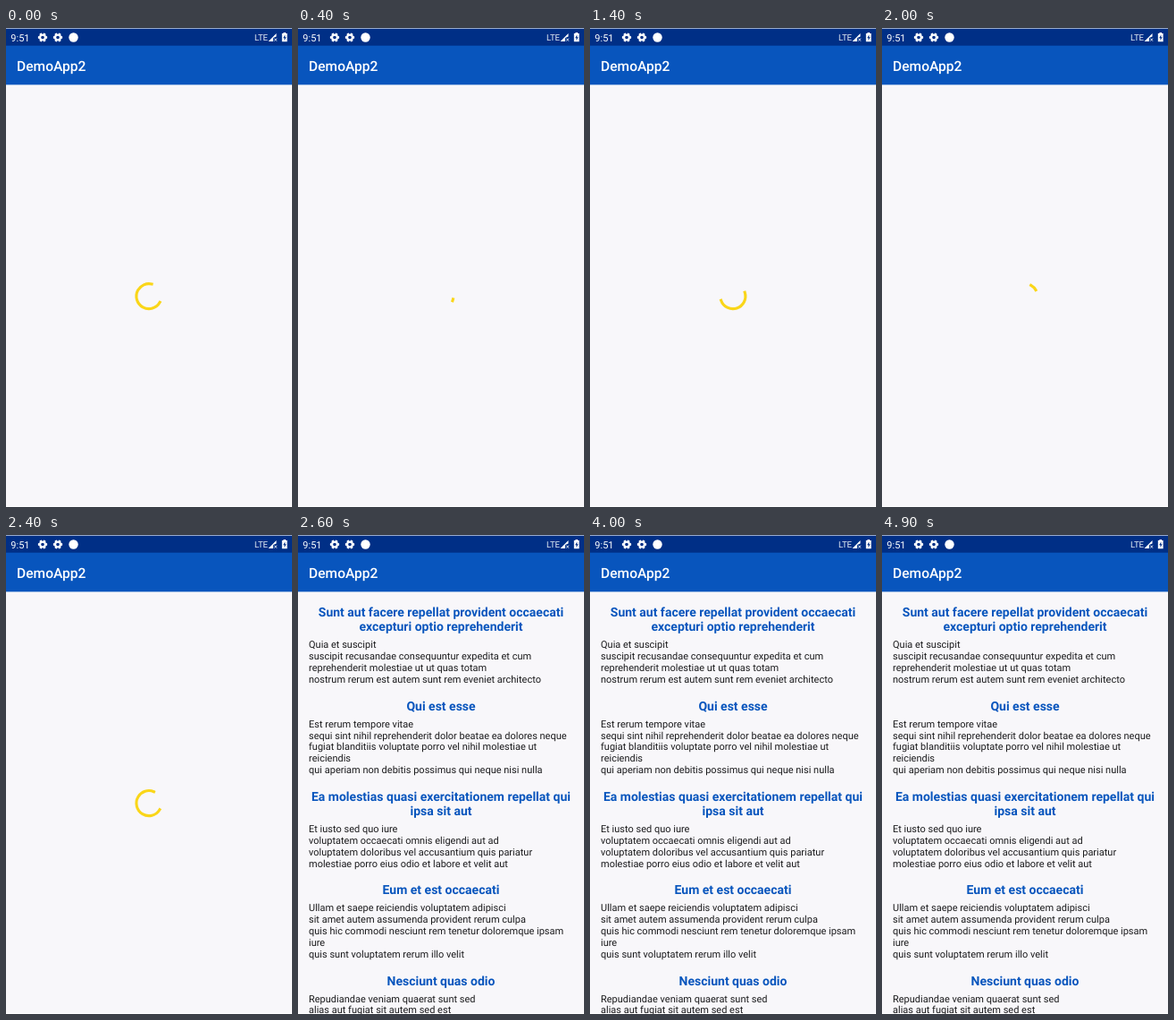
Recreate the animation shown at these times as an HTML page. Size 320x535 px, loop 5 s.

```html
<!DOCTYPE html>
<html lang="en">
<head>
<meta charset="utf-8">
<title>DemoApp2</title>
<style>
  html, body { margin: 0; width: 100%; height: 100%; overflow: hidden; background: #fff; }
  svg { display: block; }
  text { font-family: Roboto, Arial, sans-serif; text-rendering: geometricPrecision; }
  .head { font-size: 14px; font-weight: 700; fill: #0855bd; text-anchor: middle; }
  .body { font-size: 11px; fill: #1b1b1d; }
  .status { font-size: 11px; fill: #fff; }
  .bar { font-size: 15.6px; font-weight: 500; fill: #fff; }
</style>
</head>
<body>
<svg width="320" height="535" viewBox="0 0 320 535">
  <defs>
    <g id="gear" fill="none" stroke="#fff">
      <circle r="2.9" stroke-width="2.2"/>
      <circle r="4.3" stroke-width="1.7" pathLength="12" stroke-dasharray="1.1 .9" stroke-dashoffset=".55"/>
    </g>
  </defs>

  <rect y="60" width="320" height="474" fill="#f8f7fa"/>
  <g id="list" visibility="hidden"></g>
  <circle id="spinner" r="14" fill="none" stroke="#fad619" stroke-width="3.1"
          stroke-linecap="square" pathLength="360"/>

  <rect y="19" width="320" height="44.4" fill="#0855bd"/>
  <rect y=".6" width="320" height="19.1" fill="#002f86"/>
  <text class="bar" x="12" y="48">DemoApp2</text>

  <text class="status" x="5.3" y="14.6">9:51</text>
  <use href="#gear" x="41" y="10.5"/>
  <use href="#gear" x="58" y="10.5"/>
  <circle cx="75.5" cy="10.5" r="5.2" fill="#fff"/>
  <text class="status" x="278" y="14" style="font-size:9.6px" fill-opacity=".9">LTE</text>
  <path d="M293.5 15L302.5 6V9.5L299 11V15Z" fill="#fff"/>
  <path d="M300.3 11.6l2.6 3m0-3l-2.6 3" stroke="#fff" stroke-width=".9"/>
  <path d="M310.4 5h2.6v1.1h1.6v9.2h-5.8V6.1h1.6Z" fill="#fff"/>
  <path d="M312.3 7.4l-2.2 3.8h1.4v2.9l2.1-3.9h-1.3Z" fill="#002f86"/>
</svg>

<script>
  const LOOP = 5000, LOADED = 2600, STEP = 100;
  const list = document.getElementById('list');
  const spinner = document.getElementById('spinner');

  const posts = [
    ['Sunt aut facere repellat provident occaecati|excepturi optio reprehenderit',
     'Quia et suscipit|suscipit recusandae consequuntur expedita et cum|reprehenderit molestiae ut ut quas totam|nostrum rerum est autem sunt rem eveniet architecto'],
    ['Qui est esse',
     'Est rerum tempore vitae|sequi sint nihil reprehenderit dolor beatae ea dolores neque|fugiat blanditiis voluptate porro vel nihil molestiae ut|reiciendis|qui aperiam non debitis possimus qui neque nisi nulla'],
    ['Ea molestias quasi exercitationem repellat qui|ipsa sit aut',
     'Et iusto sed quo iure|voluptatem occaecati omnis eligendi aut ad|voluptatem doloribus vel accusantium quis pariatur|molestiae porro eius odio et labore et velit aut'],
    ['Eum et est occaecati',
     'Ullam et saepe reiciendis voluptatem adipisci|sit amet autem assumenda provident rerum culpa|quis hic commodi nesciunt rem tenetur doloremque ipsam|iure|quis sunt voluptatem rerum illo velit'],
    ['Nesciunt quas odio',
     'Repudiandae veniam quaerat sunt sed|alias aut fugiat sit autem sed est']
  ];

  // Writes lines downwards and returns the last baseline.
  function addLines(text, cls, x, y, pitch) {
    const lines = text.split('|');
    lines.forEach((line, i) => {
      const el = document.createElementNS('http://www.w3.org/2000/svg', 'text');
      el.setAttribute('class', cls);
      el.setAttribute('x', x);
      el.setAttribute('y', y + i * pitch);
      el.textContent = line;
      list.append(el);
    });
    return y + (lines.length - 1) * pitch;
  }

  let y = 91;
  for (const [head, body] of posts) {
    y = addLines(head, 'head', 160, y, 16.4) + 19;
    y = addLines(body, 'body', 12, y, 12.85) + 30.7;
  }

  // Cubic easing on x from 0 to 0.5, solved by bisection.
  function ease(x, x1, x2) {
    if (x <= 0) return 0;
    if (x >= .5) return 1;
    let lo = 0, hi = 1;
    for (let i = 0; i < 24; i++) {
      const u = (lo + hi) / 2, v = 1 - u;
      if (3 * u * v * v * x1 + 3 * u * u * v * x2 + u ** 3 * .5 < x) lo = u; else hi = u;
    }
    return 3 * lo * lo - 2 * lo ** 3;
  }

  // Material indeterminate ring: the head runs ahead, then the tail catches up.
  function drawSpinner(time) {
    const p = time / 1333 % 1;
    const head = 270 * ease(p, .2, .1);
    const tail = 270 * ease(p - .5, .2, .1);
    const turn = 90 * p + time * 720 / 4444;
    spinner.setAttribute('stroke-dasharray', `${Math.max(head - tail, .01)} 360`);
    spinner.setAttribute('transform', `translate(159.9 299.6) rotate(${tail + turn - 90})`);
  }

  function draw() {
    const t = performance.now() % LOOP;
    const loaded = t >= LOADED;
    list.setAttribute('visibility', loaded ? 'visible' : 'hidden');
    spinner.setAttribute('visibility', loaded ? 'hidden' : 'visible');
    if (!loaded) {
      const step = Math.min(Math.floor(t / STEP), 24);
      drawSpinner(4761 + step * STEP + (step ? 30 : 0));
    }
    requestAnimationFrame(draw);
  }
  draw();
</script>
</body>
</html>
```
